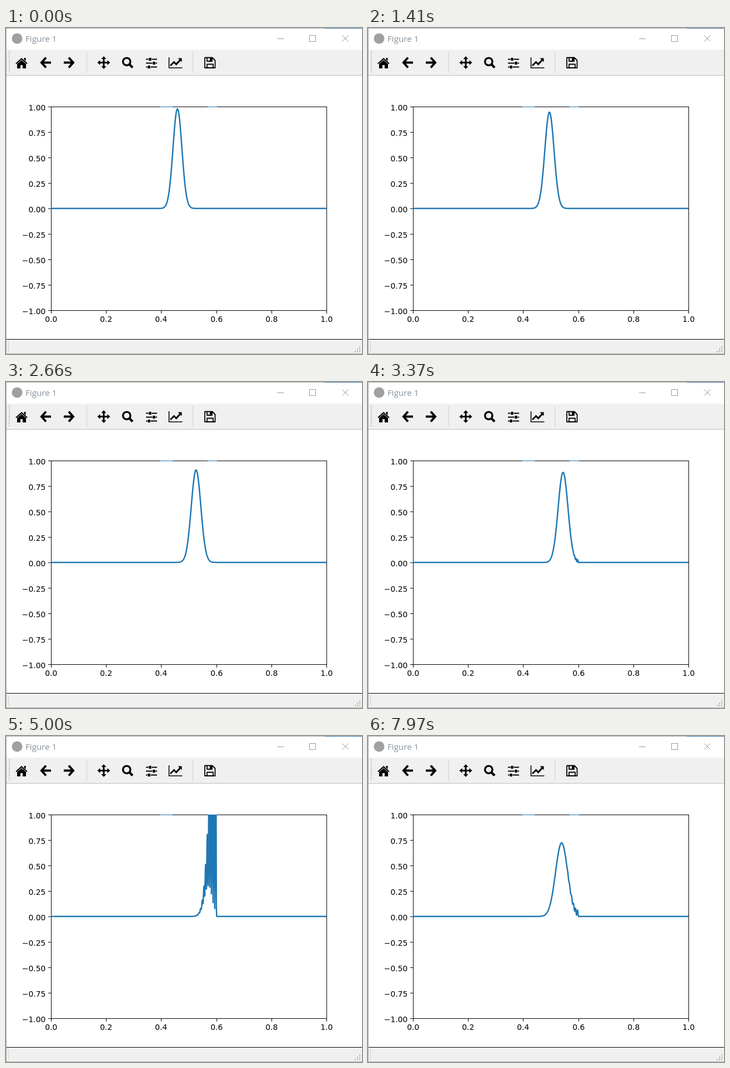
Write an HTML page that moves like this. It is 641x589 px and loops after 8000 ms.

```html
<!DOCTYPE html>
<html lang="en">
<head>
<meta charset="utf-8">
<title>Figure 1</title>
<style>
  html, body { margin: 0; width: 100%; height: 100%; overflow: hidden; background: #fff; }
  svg { display: block; }
  .labels { font: 13.89px "DejaVu Sans", sans-serif; }
  .title { font: 15.2px "Open Sans", sans-serif; fill: #84919b; }
  .crisp { shape-rendering: crispEdges; }
  .line { fill: none; stroke: #000; }
</style>
</head>
<body>
<svg width="641" height="589" viewBox="0 0 641 589">
  <defs>
    <clipPath id="plotArea"><rect x="81" y="142" width="497" height="369"/></clipPath>
    <pattern id="gripDots" width="4" height="4" patternUnits="userSpaceOnUse" x="5" y="42">
      <path d="M0 0h2v2h-2z" fill="#bdbdbd"/>
    </pattern>
  </defs>

  <!-- window frame -->
  <g class="crisp">
    <rect width="641" height="589" fill="#fff"/>
    <rect y="39" width="641" height="46" fill="#f0f0f0"/>
    <rect y="85" width="641" height="1" fill="#bcbcbc"/>
    <rect y="563" width="641" height="25" fill="#f0f0f0"/>
    <rect y="562" width="641" height="1"/>
    <path d="M0 0h641v1h-641zM0 0h1v589h-1zM0 588h641v1h-641z" fill="#aaa"/>
    <rect x="574" width="67" height="1" fill="#3a78a8"/>
    <path d="M145 43h1v38h-1zM336 43h1v38h-1zM4 566h1v19h-1z" fill="#d0d0d0"/>
    <rect x="5" y="42" width="2" height="39" fill="url(#gripDots)"/>
    <path d="M636 575h2v3h-2zM632 579h2v3h-2zM636 579h2v3h-2zM628 583h2v3h-2zM632 583h2v3h-2zM636 583h2v3h-2z" fill="#bdbdbd"/>
    <path d="M488 19.5h12M546.5 13.5h11v11h-11z" fill="none" stroke="#999"/>
  </g>
  <path d="M605.5 13.5l11 11M616.5 13.5l-11 11" stroke="#999"/>
  <circle cx="20" cy="19" r="9.5" fill="#a0a0a0"/>
  <text class="title" x="35" y="25">Figure 1</text>

  <!-- toolbar icons -->
  <path d="M20 65l8-7 8 7v8h-6v-6h-4v6h-6zM32.500 54h3v6l-3-3z"/>
  <path class="line" d="M18 64.500l10-9 10 9" stroke-width="2.200"/>
  <g class="line" stroke-width="4">
    <path d="M72 53.500l-8 9 8 9M64 62.500h17"/>
    <path d="M113 53.500l8 9-8 9M121 62.500h-17"/>
  </g>
  <path class="line" d="M168 62.500h16M176 54.500v16" stroke-width="3"/>
  <path d="M176 51l4.500 5h-9zM176 74l4.500-5h-9zM164.500 62.500l5-4.500v9zM187.500 62.500l-5-4.500v9z"/>
  <circle class="line" cx="217.300" cy="60.800" r="6.700" stroke-width="3.400"/>
  <path class="line" d="M222 65.500l6 6" stroke-width="4.200"/>
  <path class="line" d="M252 56.500h20M252 63.500h20M252 70.500h20" stroke-width="1.800"/>
  <path d="M257 53.500h5v6h-5zM264 60.500h5v6h-5zM255 67.500h5v6h-5z" stroke="#f0f0f0" stroke-width=".8"/>
  <path class="line" d="M293.500 53v19h24" stroke-width="1.600"/>
  <path class="line" d="M296 68l6.500-6.500 4 4 7-7.500" stroke-width="3"/>
  <path d="M309.500 54.500h7v7z"/>
  <path class="line" d="M358 53.500h13.500l5 5v13.500h-18.500zM362 54v6h9v-6M362 72v-6.500h11v6.500" stroke-width="1.800" stroke-linejoin="round"/>
  <path d="M367 54h3v5h-3z"/>

  <!-- axes -->
  <g id="axes" class="crisp">
    <rect class="line" x="81.500" y="142.500" width="496" height="368"/>
    <path d="M278 142h22v1h-22zM363 142h17v1h-17z" fill="#1f77b4"/>
  </g>
  <g id="labels" class="labels"></g>
  <path id="curve" clip-path="url(#plotArea)" fill="none" stroke="#1f77b4" stroke-width="2.5" stroke-linejoin="round"/>
</svg>
<script>
const LOOP = 8000, FRAME = 65, PHASE = 32;
const byId = id => document.getElementById(id);

function add(parent, name, attrs, text = '') {
  const node = document.createElementNS('http://www.w3.org/2000/svg', name);
  for (const key in attrs) node.setAttribute(key, attrs[key]);
  node.textContent = text;
  parent.append(node);
}

function drawTicks() {
  for (let i = 0; i <= 8; i++) {
    const y = 142 + 46 * i;
    add(byId('axes'), 'rect', { x: 76, y, width: 5, height: 1 });
    add(byId('labels'), 'text', { x: 71.3, y: y + 6.8, 'text-anchor': 'end' },
      (1 - i / 4).toFixed(2).replace('-', '−'));
  }
  for (let i = 0; i <= 5; i++) {
    const x = Math.round(81 + 99.2 * i);
    add(byId('axes'), 'rect', { x, y: 511, width: 1, height: 5 });
    add(byId('labels'), 'text', { x: x + 0.3, y: 531, 'text-anchor': 'middle' }, (i / 5).toFixed(1));
  }
}

// Schrödinger equation on a grid: a Gaussian wave packet meets a high step at x = 0.6.
const N = 1000, DX = 1 / N, DT = 1.72e-7;
const STEPS_BEFORE = 712, STEPS_PER_FRAME = 20;
const WAVE_NUMBER = 500, START = 0.4, WALL = 0.6, WALL_HEIGHT = 1e6;

const re = new Float64Array(N + 1), im = new Float64Array(N + 1);
for (let i = 1; i < N; i++) {
  const x = i * DX, envelope = Math.exp(-1000 * (x - START) ** 2);
  re[i] = envelope * Math.cos(WAVE_NUMBER * x);
  im[i] = envelope * Math.sin(WAVE_NUMBER * x);
}

// Adds dt * H(source) to dest.
function kick(dest, source, dt) {
  const c = 0.5 / (DX * DX), wallIndex = Math.round(WALL / DX);
  for (let i = 1; i < N; i++) {
    const potential = i >= wallIndex ? WALL_HEIGHT : 0;
    dest[i] += dt * ((2 * c + potential) * source[i] - c * (source[i - 1] + source[i + 1]));
  }
}

function advance(steps) {
  while (steps--) {
    kick(im, re, -DT / 2);
    kick(re, im, DT);
    kick(im, re, -DT / 2);
  }
}

function densityPath() {
  const points = [];
  for (let i = 0; i <= N; i++) {
    const density = re[i] ** 2 + im[i] ** 2;
    points.push((81.2 + 496 * i * DX).toFixed(2) + ' ' + (326 - 184 * density).toFixed(2));
  }
  return 'M' + points.join('L');
}

drawTicks();
advance(STEPS_BEFORE);
const paths = [densityPath()];
while (paths.length <= Math.floor((LOOP + PHASE) / FRAME)) {
  advance(STEPS_PER_FRAME);
  paths.push(densityPath());
}

let shown = -1;
function render(now) {
  const index = Math.floor((now % LOOP + PHASE) / FRAME);
  if (index !== shown) byId('curve').setAttribute('d', paths[shown = index]);
}

const began = performance.now();
function tick() {
  render(performance.now() - began);
  requestAnimationFrame(tick);
}
tick();
</script>
</body>
</html>
```
